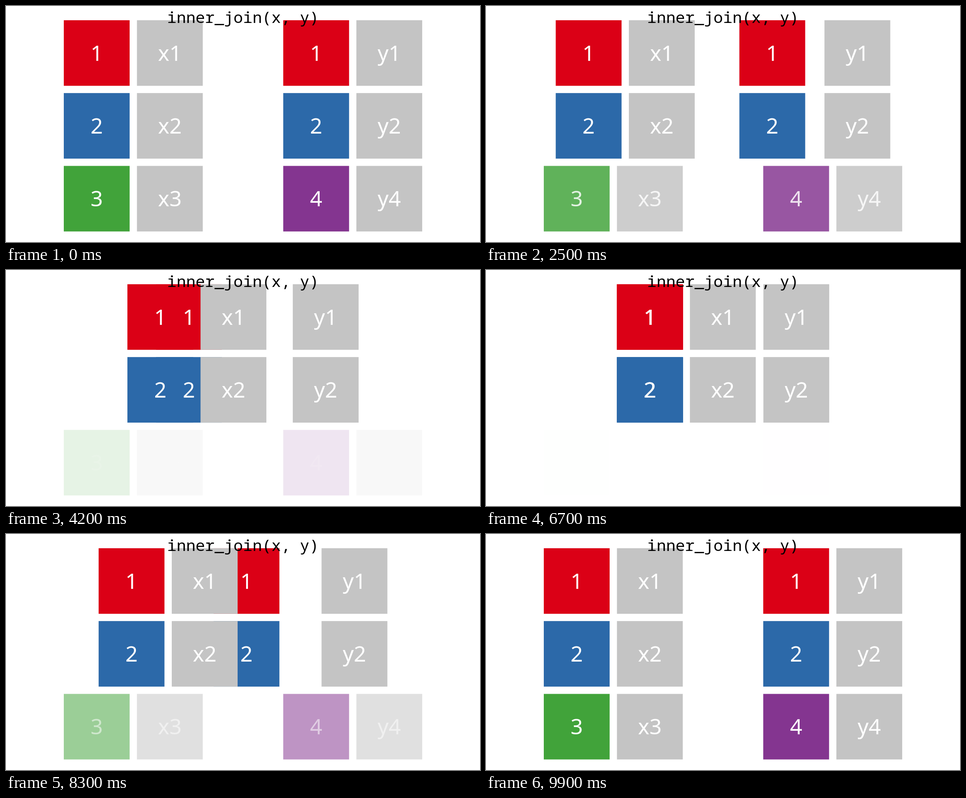
Animation of 1058 by 529 pixels, one loop 10000 ms. Source, as an HTML page:

```html
<!DOCTYPE html>
<html lang="en">
<head>
<meta charset="utf-8">
<title>Inner join</title>
<style>
  html, body { margin: 0; width: 100%; height: 100%; overflow: hidden; background: #fff; }
  svg { display: block; width: 1058px; height: 529px; --p: 0; --unit: 163.27px; }
  text { text-anchor: middle; font: 48px "Noto Sans", "Open Sans", sans-serif; fill: #fff; }
  .title { font: 35.3px "Noto Sans Mono", "DejaVu Sans Mono", monospace; fill: #000; }
  .left { transform: translateX(calc(var(--p) * var(--unit))); }
  .key { transform: translateX(calc(var(--p) * -2 * var(--unit))); }
  .right { transform: translateX(calc(var(--p) * -1 * var(--unit))); }
  .drop { opacity: calc(1 - var(--p)); }
</style>
</head>
<body>
<svg viewBox="0 0 1058 529">
  <g id="tiles"></g>
  <g id="labels"></g>
  <text class="title" x="529" y="38.3">inner_join(x, y)</text>
</svg>
<script>
  const UNIT = 163.27, SIZE = UNIT * 0.9, LEFT = 129, TOP = 31.9;
  const LOOP = 10000, STEP = 100;
  const GREY = '#c4c4c4';
  const COLORS = { 1: '#db0016', 2: '#2c69a9', 3: '#41a33a', 4: '#843590' };
  const svg = document.querySelector('svg');

  function add(parent, tag, attrs, text = '') {
    const el = document.createElementNS('http://www.w3.org/2000/svg', tag);
    for (const name in attrs) el.setAttribute(name, attrs[name]);
    el.textContent = text;
    document.getElementById(parent).append(el);
  }

  function cell(col, row, label, fill, motion) {
    const x = LEFT + col * UNIT, y = TOP + row * UNIT;
    const cls = row < 2 ? motion : 'drop';
    add('tiles', 'rect', { x, y, width: SIZE, height: SIZE, fill, class: cls });
    add('labels', 'text', { x: x + SIZE / 2, y: y + 91, class: cls }, label);
  }

  // Keys go first so that the value columns cover them.
  const xKeys = [1, 2, 3], yKeys = [1, 2, 4];
  xKeys.forEach((k, row) => cell(0, row, k, COLORS[k], 'left'));
  yKeys.forEach((k, row) => cell(3, row, k, COLORS[k], 'key'));
  xKeys.forEach((k, row) => cell(1, row, 'x' + k, GREY, 'left'));
  yKeys.forEach((k, row) => cell(4, row, 'y' + k, GREY, 'right'));

  // Sine ease-in-out from 0 to 1 between two times.
  function ease(t, from, to) {
    const u = Math.min(1, Math.max(0, (t - from) / (to - from)));
    return (1 - Math.cos(Math.PI * u)) / 2;
  }

  const start = performance.now();

  function draw() {
    const elapsed = Math.max(0, performance.now() - start) % LOOP;
    const t = Math.floor(elapsed / STEP) * STEP;
    const p = ease(t, 1600, 5000) - ease(t, 6600, 9900);
    svg.style.setProperty('--p', p.toFixed(5));
    requestAnimationFrame(draw);
  }
  draw();
</script>
</body>
</html>
```
